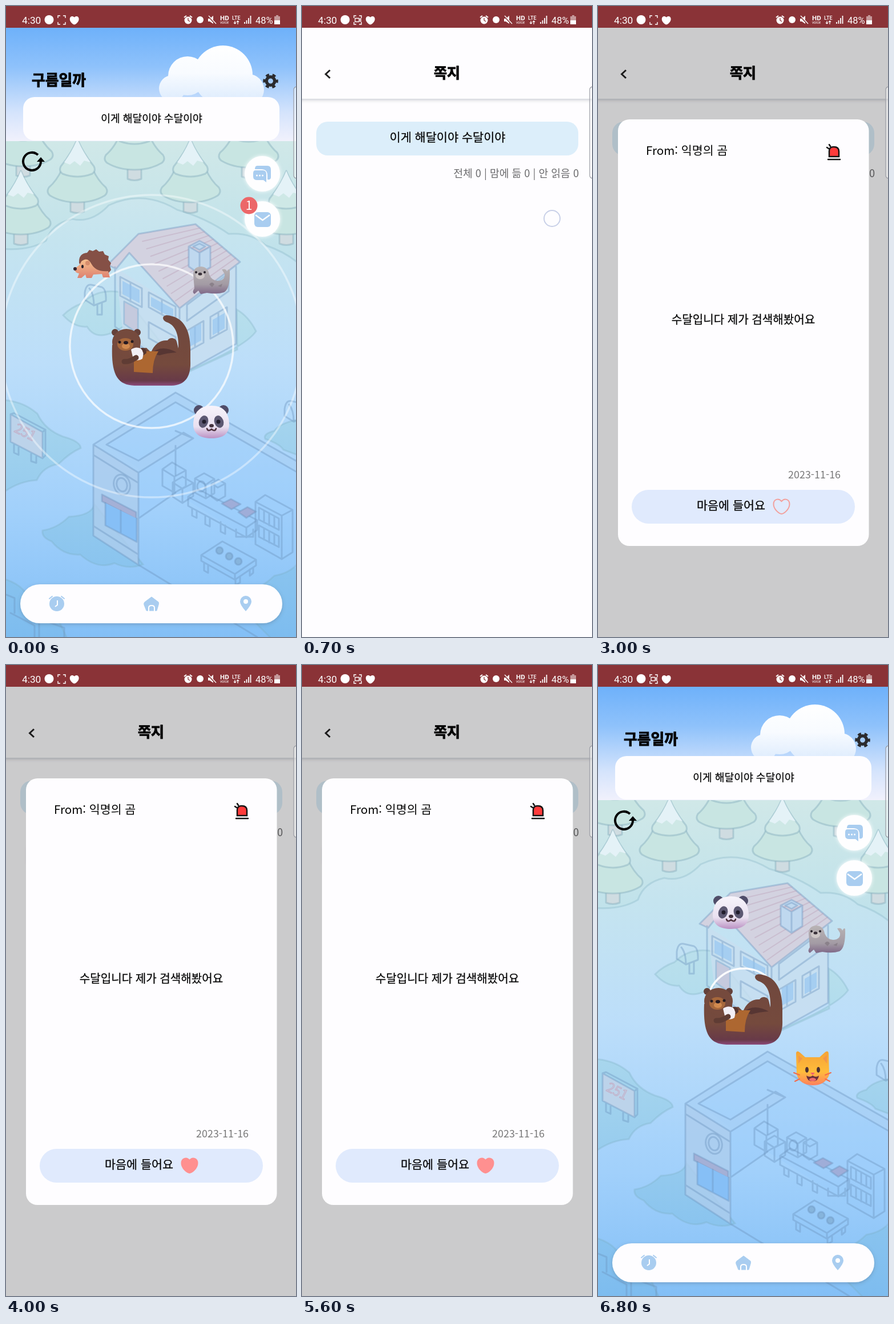
An HTML page for the animation above (6900 ms loop, 508 by 1102 pixels).

```html
<!DOCTYPE html>
<html lang="ko">
<head>
<meta charset="utf-8">
<style>
html, body { margin: 0; width: 100%; height: 100%; overflow: hidden; background: #fefdff; }
svg { display: block; width: 100%; height: 100%; }
text { font-family: "Noto Sans CJK KR", "Noto Sans CJK", "Noto Sans", sans-serif; fill: #050505; }
.heading { font-weight: 900; stroke: #050505; stroke-width: .9; }
.medium { font-weight: 500; stroke: #050505; stroke-width: .25; }
.line { fill: none; stroke: #6c94bd; stroke-width: 3; stroke-opacity: .4; stroke-linejoin: round; stroke-linecap: round; }
.status text { font-family: Roboto, sans-serif; fill: #fff; }
</style>
</head>
<body>
<svg viewBox="0 0 508 1102" preserveAspectRatio="none">
<defs>
  <linearGradient id="sky" x2="0" y2="1"><stop stop-color="#6eb1fa"/><stop offset=".35" stop-color="#8fc2fb"/><stop offset=".75" stop-color="#d5e4fc"/><stop offset="1" stop-color="#f1f1fc"/></linearGradient>
  <linearGradient id="ground" x2="0" y2="1"><stop stop-color="#d4e9eb"/><stop offset=".2" stop-color="#c5e4ef"/><stop offset=".45" stop-color="#bcdefa"/><stop offset=".75" stop-color="#a1d0fb"/><stop offset="1" stop-color="#83bff6"/></linearGradient>
  <linearGradient id="grass" gradientUnits="userSpaceOnUse" y1="236" x2="0" y2="1102"><stop stop-color="#d0e8e8"/><stop offset=".4" stop-color="#b3dded"/><stop offset="1" stop-color="#7dbcef"/></linearGradient>
  <linearGradient id="cloudFill" gradientUnits="userSpaceOnUse" y1="69" x2="0" y2="165"><stop stop-color="#fff"/><stop offset=".5" stop-color="#f8fbff"/><stop offset="1" stop-color="#deecfd"/></linearGradient>
  <linearGradient id="fur" x2="0" y2="1"><stop stop-color="#70483e"/><stop offset=".7" stop-color="#754a3d"/><stop offset=".93" stop-color="#683a48"/><stop offset="1" stop-color="#8c4b7c"/></linearGradient>
  <linearGradient id="sealFur" x2="0" y2="1"><stop stop-color="#b9b4b5"/><stop offset=".65" stop-color="#a39ba4"/><stop offset="1" stop-color="#7f6888"/></linearGradient>
  <linearGradient id="pandaFur" x2="0" y2="1"><stop stop-color="#f7f4fb"/><stop offset=".65" stop-color="#e9e0f0"/><stop offset="1" stop-color="#bb91c3"/></linearGradient>
  <linearGradient id="catFur" x2="0" y2="1"><stop stop-color="#f5a336"/><stop offset=".6" stop-color="#ffbc3b"/><stop offset="1" stop-color="#ff805e"/></linearGradient>
  <linearGradient id="skin" x2="0" y2="1"><stop stop-color="#f6c08e"/><stop offset="1" stop-color="#dd8170"/></linearGradient>
  <linearGradient id="badgeFill" x2="0" y2="1"><stop stop-color="#f8fcff"/><stop offset="1" stop-color="#d9e6f2"/></linearGradient>
  <filter id="shadow" x="-20%" y="-30%" width="140%" height="170%"><feDropShadow dx="0" dy="2" stdDeviation="3" flood-color="#456" flood-opacity=".3"/></filter>
  <filter id="glow" x="-30%" y="-30%" width="160%" height="160%"><feDropShadow dx="0" dy="0" stdDeviation="3" flood-color="#fff"/></filter>
  <clipPath id="groundClip"><path d="M0 236H508V1102H0Z"/></clipPath>
  <path id="heart" d="M0 13C-4 13-14 5-14-4C-14-13-5-15 0-9C5-15 14-13 14-4C14 5 4 13 0 13Z"/>
  <g id="tree" stroke="#86adbd" stroke-opacity=".45" stroke-width="3" stroke-linejoin="round">
    <path d="M-12 98H12V122Q0 127-12 122Z" fill="#cfdce1"/>
    <path d="M-27 48Q-36 68-50 80Q-55 88-48 94Q-28 106 0 106T48 94Q55 88 50 80Q36 68 27 48Z" fill="#c8e5e2"/>
    <path d="M0-5Q10 20 29 43Q33 51 26 56Q0 66-26 56Q-33 51-29 43Q-10 20 0-5Z" fill="#cee8e6"/>
    <path d="M0-5Q8 15 23 36L12 33L5 42L-5 34L-13 40L-23 36Q-8 15 0-5Z" fill="#e4f2f7" stroke="none"/>
  </g>
  <g id="mailbox" class="line"><path d="M-18-6Q-16-22-6-20L12-16Q20-12 19 8L-2 16L-18 6ZM-2 16Q-2-4-10-14M4 14V32H12V11"/></g>
</defs>

<g id="home">
  <path fill="url(#sky)" d="M0 38H508V236H0Z"/>
  <g fill="url(#cloudFill)"><circle cx="291" cy="144" r="23"/><circle cx="318" cy="122" r="34"/><circle cx="380" cy="121" r="52"/><circle cx="425" cy="146" r="27"/></g>
  <path fill="url(#ground)" d="M0 236H508V1102H0Z"/>
  <g clip-path="url(#groundClip)">
    <g fill="url(#grass)" stroke="#76a9ba" stroke-opacity=".28" stroke-width="3">
      <path d="M-5 230H513V450Q490 430 455 418Q430 395 390 398Q350 370 300 356Q240 320 180 348Q150 380 116 372Q80 380 70 410Q40 428-5 424Z"/>
      <path d="M100 540Q114 526 134 519Q160 492 203 500L312 640Q420 595 438 568Q425 542 404 530L405 600L300 648L205 560Q160 590 142 560Q120 562 100 540Z"/>
      <path d="M-5 688Q30 690 55 712Q68 740 100 752Q130 760 131 772Q112 780 92 800Q65 804 54 828Q22 830-5 850Z"/>
      <path d="M513 722Q480 728 470 742Q450 747 454 756Q480 765 486 775L513 785Z"/>
      <path d="M155 870Q150 890 110 892Q90 912 64 916Q62 928 80 935Q100 960 130 958Q160 985 190 973Q215 985 240 975Z"/>
      <path d="M-5 1000Q30 1010 40 1035Q85 1050 100 1090L110 1110H-5ZM513 970Q500 990 470 995Q440 1025 390 1030L470 1110H513Z"/>
    </g>
    <g id="trees"></g>

    <path d="M191 456L304 528L403 450V590L304 646L205 570Z" fill="#c8dff1" opacity=".8"/>
    <path d="M178 452L232 398L332 381L410 447L304 528L216 431L193 459Z" fill="#d3d2e0"/>
    <g class="line">
      <path d="M178 452L232 398L332 381L410 447L304 528L216 431L193 459ZM191 456V560L304 645L403 590V455M304 528V645M216 431L304 528"/>
      <path id="planks" stroke="#b99fb4" stroke-width="2"/>
      <path d="M200 473L238 493V526L200 506ZM218 483V516M250 500L297 525V552L250 526ZM273 513V539M207 516L231 529V572L207 555ZM250 552L297 578V606L250 580ZM317 567L346 550V588L317 604ZM331 559V596M358 543L387 526V565L358 581ZM372 535V573M317 522L390 467V498L317 550Z"/>
      <path d="M320 420L339 410L358 420V456L339 468L320 455ZM320 420L339 431L358 420M339 431V468M328 420L339 415L349 420L339 426Z" fill="#bfd8ef"/>
    </g>
    <path d="M322 565L342 554V584L322 595ZM362 548L383 536V563L362 575ZM204 480L234 496V519L204 503ZM254 508L293 529V546L254 524Z" fill="#8fc3f2" opacity=".6"/>
    <path d="M208 518L230 530V570L208 554Z" fill="#c7c2d8" opacity=".7"/>
    <use href="#mailbox" x="156" y="507"/>
    <use href="#mailbox" x="506" y="710"/>

    <path d="M8 713L64 744V790L8 761Z" fill="#bcd3ea"/>
    <path class="line" d="M8 713L64 744V790L8 761ZM14 765V780L22 784V770M44 782V795L53 798V786M8 713L14 711L69 740L64 744M69 740V785L64 790"/>
    <text x="13" y="743" font-size="23" transform="rotate(27 13 743)" style="fill:none;stroke:#c6a5bd;stroke-width:1.1" opacity=".8">251</text>

    <path d="M153 766L232 815V976L153 925Z" fill="#adcdee" opacity=".8"/>
    <path d="M176 766L297 692L520 820V990L297 850L232 895V808Z" fill="#95c8f8" opacity=".35"/>
    <path d="M153 766L297 675L520 801V820L297 692L176 766L232 794L311 745L328 755L232 815Z" fill="#a9d1f6" opacity=".7"/>
    <g class="line">
      <path d="M153 766L297 675L520 801M176 766L297 692L520 820M153 766L232 815L328 755L311 745L232 794L176 766M153 766V925L232 976V815M232 976L440 1102M153 784L232 833M297 768V819M232 895L297 850M153 908L232 958M328 755L297 742"/>
      <path d="M168 853L228 884V896L168 865Z" fill="#a4b0d6"/>
      <path d="M174 868V907L229 936V895M201 881V921" fill="#86bff6"/>
      <ellipse cx="203" cy="836" rx="14" ry="18" transform="rotate(-16 203 836)"/>
      <ellipse cx="203" cy="836" rx="9" ry="12" transform="rotate(-16 203 836)"/>
      <path d="M274 809L291 797L315 811V839L295 850L274 838ZM274 809L295 822L315 811M295 822V850M292 832L309 822L328 833V856L309 868L292 857ZM292 832L309 843L328 833M309 843V868"/>
      <path d="M319 857L337 844L440 898V915L421 928L319 873ZM319 857L421 911L440 898M421 911V928M326 877V890L334 894V882M349 889V905L357 909V894M376 901V918L384 922V907M403 914V927H433V914"/>
      <path d="M331 825L347 816L365 826V851L350 860L331 850ZM331 825L350 836L365 826M350 836V860M360 834L372 827L384 834V856L370 864L360 857ZM360 834L371 841L384 834"/>
      <ellipse cx="342" cy="839" rx="7" ry="9"/>
      <path d="M378 869L394 861L411 870L395 879ZM407 884L423 875L438 883L421 894Z" fill="#9fadd8"/>
      <path d="M437 866L454 854L502 880V954L483 966L437 940ZM437 866L483 890L502 880M483 890V966M443 876L478 895V915L443 897ZM443 907L478 926V945L443 927ZM452 881V902M461 886V907M470 891V911M452 912V932M461 917V937M470 922V941"/>
      <path d="M342 959L379 935L438 967L401 992ZM342 959V969L401 1002L438 977V967M401 992V1002M347 973V986L354 990V977M402 1001V1011L410 1007V996M427 984V995L433 990V981"/>
      <g fill="#86b4dc"><circle cx="374" cy="951" r="6"/><circle cx="391" cy="961" r="6"/><circle cx="407" cy="970" r="6"/></g>
      <path d="M0 1028L15 1034V1060M58 1070L102 1086V1102M58 1070V1102M8 1060L50 1082V1102"/>
    </g>
  </g>

  <g id="ripples" fill="none" stroke="#fff" stroke-width="3.5"></g>

  <g id="otter">
    <path fill="url(#fur)" d="M186 592C184 642 194 662 225 663H290C316 662 324 645 323 620V600C323 563 309 542 281 540C273 541 273 548 281 552C297 557 303 574 302 598L299 586A9 9 0 0 0 283 584Q263 583 254 605L246 597L235 598V587Z"/>
    <path d="M254 607Q272 590 299 605Q282 606 269 610Z" fill="#573633"/>
    <path d="M224 603H267Q257 617 257 641L224 639Z" fill="#ad6731"/>
    <circle cx="191" cy="570" r="6" fill="#64413a"/><circle cx="230" cy="570" r="6" fill="#64413a"/>
    <ellipse cx="211" cy="587" rx="25" ry="23" fill="#754a3d"/>
    <ellipse cx="209" cy="591" rx="14" ry="11" fill="#a7683c"/>
    <ellipse cx="210" cy="594" rx="7" ry="5" fill="#d18a4f"/>
    <ellipse cx="210" cy="588" rx="4" ry="3" fill="#261a22"/>
    <circle cx="199" cy="587" r="2.5" fill="#251b20"/><circle cx="221" cy="586" r="2.5" fill="#251b20"/>
    <path d="M233 598Q246 594 246 606L236 614Z" fill="#57362f"/>
    <path d="M219 600Q227 594 236 598Q243 604 239 616Q232 621 223 617Z" fill="#f3eff5"/>
    <path d="M207 621Q216 622 228 614" fill="none" stroke="#5f3c34" stroke-width="9" stroke-linecap="round"/>
  </g>

  <g id="hedgehog">
    <path d="M128 449Q127 432 142 431L146 426L152 428L158 425L163 429L170 428L173 434L180 437L179 443L184 449L182 454L184 461L179 467H142Z" fill="#855046"/>
    <path d="M119 459Q130 453 132 446Q143 437 150 451Q158 465 179 463L182 474H170L168 468L153 469L150 475H141L139 469L132 475H125L128 467Q121 466 119 459Z" fill="url(#skin)"/>
    <circle cx="143" cy="449" r="4" fill="#d78d6c"/><circle cx="121" cy="459" r="3" fill="#34242e"/><ellipse cx="134" cy="455" rx="2" ry="3" fill="#27212b"/>
  </g>

  <g id="seal">
    <path d="M328 469Q328 455 342 455Q354 456 356 469Q362 483 377 479Q384 476 383 468L378 460Q386 458 387 464Q390 458 392 461Q393 494 382 500Q370 504 352 501L341 503L337 497L330 503Q325 500 330 493Z" fill="url(#sealFur)"/>
    <path d="M356 486Q361 480 365 486L361 491ZM371 489L379 485L377 491Z" fill="#8a818a"/>
    <ellipse cx="340" cy="471" rx="8" ry="6" fill="#cdc6c6"/><ellipse cx="340" cy="468" rx="3.5" ry="2.5" fill="#39313a"/>
    <circle cx="333" cy="465" r="2" fill="#29242c"/><circle cx="348" cy="465" r="2" fill="#29242c"/>
  </g>

  <g id="panda">
    <circle cx="338" cy="706" r="9" fill="#504d69"/><circle cx="381" cy="706" r="9" fill="#504d69"/>
    <path d="M328 732C328 709 340 698 360 698S391 709 391 732C390 749 378 755 360 755S329 749 328 732Z" fill="url(#pandaFur)"/>
    <ellipse cx="346" cy="726" rx="8" ry="11" transform="rotate(20 346 726)" fill="#5c5872"/><ellipse cx="373" cy="726" rx="8" ry="11" transform="rotate(-20 373 726)" fill="#5c5872"/>
    <circle cx="347" cy="726" r="3.5" fill="#211d2c"/><circle cx="372" cy="726" r="3.5" fill="#211d2c"/>
    <ellipse cx="360" cy="733" rx="4" ry="3" fill="#44333f"/>
    <path d="M352 738Q354 744 360 739Q366 744 368 738" fill="none" stroke="#513541" stroke-width="2.5" stroke-linecap="round"/>
  </g>

  <g id="cat">
    <path d="M348 715L347 678Q348 672 354 677L363 685H388L398 676Q404 672 404 680L405 716Q398 734 376 734Q353 733 348 715Z" fill="url(#catFur)"/>
    <path d="M351 682L358 687L351 696ZM401 681L394 687L401 696Z" fill="#f2964a"/>
    <ellipse cx="366" cy="707" rx="3" ry="5" fill="#4b3033"/><ellipse cx="386" cy="707" rx="3" ry="5" fill="#4b3033"/>
    <path d="M372 712H380L376 716Z" fill="#f05d70"/>
    <path d="M365 717Q371 721 376 717Q382 721 387 717Q386 727 376 727Q366 727 365 717Z" fill="#6a313b"/><ellipse cx="376" cy="724" rx="6" ry="3" fill="#ef6b6d"/>
    <path d="M343 712L353 716M345 727L353 723M408 712L398 716M406 727L398 723" stroke="#f46b4b" stroke-width="2" stroke-linecap="round"/>
  </g>

  <rect x="30" y="159" width="449" height="76" rx="20" fill="#fefdff"/>
  <text class="heading" x="45" y="139" font-size="25.8">구름일까</text>
  <text class="medium" x="255" y="203" font-size="18.2" text-anchor="middle">이게 해달이야 수달이야</text>
  <g transform="translate(463.5 131)" fill="none" stroke="#2b2b2e"><circle r="7.2" stroke-width="5.5"/><circle r="11" stroke-width="4.5" stroke-dasharray="5.76" stroke-dashoffset="2.88"/></g>
  <path d="M56 260A15.500 15.500 0 1 0 61 271" fill="none" stroke="#000" stroke-width="4"/><path d="M54 272L61 264L68 272Z"/>

  <g fill="#fefeff" filter="url(#glow)"><circle cx="449" cy="293" r="31"/><circle cx="449" cy="372" r="31"/></g>
  <g fill="#a9cdf0">
    <path d="M440 279H458Q464 279 464 286V299Q464 304 458 303V296Q458 285 447 285H436Q436 279 440 279Z"/>
    <path d="M437 287H450Q456 287 456 294V308L451 304H440Q433 304 433 298V292Q433 287 437 287Z"/>
    <rect x="435" y="360" width="29" height="26" rx="6"/>
  </g>
  <path d="M437 365L449.5 374L462 365" fill="none" stroke="#fff" stroke-width="2.5"/>
  <g fill="#fff"><circle cx="439.5" cy="296" r="1.5"/><circle cx="444.5" cy="296" r="1.5"/><circle cx="449.5" cy="296" r="1.5"/></g>
  <g id="badge"><circle cx="425.5" cy="348.5" r="15" fill="#ec6769"/><text x="425.5" y="356" font-size="21" text-anchor="middle" style="fill:#fff">1</text></g>

  <rect x="25" y="1010" width="459" height="68" rx="34" fill="#fefdff" filter="url(#shadow)"/>
  <g fill="#a9cdf0">
    <circle cx="89" cy="1044" r="13"/><path d="M76 1035L81 1031M102 1035L97 1031" stroke="#a9cdf0" stroke-width="2" stroke-linecap="round"/>
    <path d="M255 1032L267 1041Q268 1043 267 1046L264 1056H246L242 1046Q241 1043 243 1041Z" stroke="#a9cdf0" stroke-linejoin="round"/>
    <path d="M420 1057Q410 1046 410 1040A10 10 0 0 1 430 1040Q430 1046 420 1057Z"/>
  </g>
  <path d="M90 1038V1046L86 1049M250 1057V1051Q250 1047 255 1047T260 1051V1057" fill="none" stroke="#fff" stroke-width="2"/><circle cx="420" cy="1040" r="4" fill="#fff"/>
</g>

<g id="notes">
  <path d="M0 38H508V1102H0Z" fill="#fefdff"/>
  <path d="M-9 30H517V162H-9Z" fill="#fefdff" filter="url(#shadow)"/>
  <path d="M49 112L41.5 119L49 126" fill="none" stroke="#222" stroke-width="3"/>
  <text class="heading" x="254" y="126" font-size="25" text-anchor="middle">쪽지</text>
  <rect x="25" y="202" width="459" height="59" rx="20" fill="#dceefa"/>
  <text class="medium" x="255" y="237" font-size="20.8" text-anchor="middle">이게 해달이야 수달이야</text>
  <text id="counts" x="485" y="299" font-size="18.2" font-weight="300" text-anchor="end" style="fill:#6a6a6c"></text>
  <g id="unread"></g>
  <g id="read"></g>
  <g id="liked"><rect x="39" y="315" width="34" height="31" rx="4" fill="url(#badgeFill)" filter="url(#shadow)"/><use href="#heart" transform="translate(56 330) scale(.62)" fill="#ff8d90"/></g>
  <g id="popup">
    <path d="M0 38H508V1102H0Z" fill-opacity=".2"/>
    <rect x="35" y="198" width="439.5" height="745" rx="20" fill="#fefdff"/>
    <text x="84" y="260" font-size="20.6">From: 익명의 곰</text>
    <g stroke="#151515" stroke-width="2.5" stroke-linecap="round"><path d="M405 263V253Q405 246 413 246Q422 246 422 254V263Z" fill="#ff3b3b"/><path d="M403 268H424M404 249L401 247M407 245L405 242"/></g>
    <text class="medium" x="254.5" y="555" font-size="20.1" text-anchor="middle">수달입니다 제가 검색해봤어요</text>
    <text x="425" y="825" font-size="17.9" text-anchor="end" style="fill:#777">2023-11-16</text>
    <rect x="59" y="845" width="391" height="59" rx="29.5" fill="#e0eafd"/>
    <text class="medium" x="173" y="880" font-size="20.7">마음에 들어요</text>
    <use id="like" href="#heart" x="321.5" y="874" stroke-width="2"/>
  </g>
</g>

<rect x="504" y="141" width="12" height="160" rx="5" fill="#fff" fill-opacity=".45" stroke="#999ba3" stroke-width="1.2"/>
<circle id="touch" r="14" fill="#fff" fill-opacity=".35" stroke="#c9d0e8" stroke-width="2"/>

<g class="status" fill="#fff" stroke="none">
  <path d="M0 0H508V38H0Z" fill="#8a3337"/>
  <text x="28" y="31" font-size="17.3">4:30</text>
  <circle cx="75.5" cy="24" r="8"/>
  <path d="M91 21V17H95M100 17H104V21M104 28V32H100M95 32H91V28" fill="none" stroke="#fff" stroke-width="1.4"/>
  <path id="camera" d="M93 21.5H100V27.5H93ZM100 24L103 22V27L100 25" fill="none" stroke="#fff" stroke-width="1.3"/>
  <use href="#heart" transform="translate(119.7 25) scale(.57)"/>
  <circle cx="319" cy="25" r="6.5"/><path d="M312 20L316 17M326 20L322 17" stroke="#fff" stroke-width="2"/><path d="M319 21V25L322 27" fill="none" stroke="#8a3337" stroke-width="1.3"/>
  <circle cx="340" cy="24" r="6"/>
  <path d="M354 22H357L363 17V31L357 27H354Z"/><path d="M354 17L367 31" stroke="#8a3337" stroke-width="3"/><path d="M355 17L368 31" stroke="#fff" stroke-width="1.3"/>
  <text x="375" y="25" font-size="11.5" font-weight="700">HD</text><text x="375" y="31" font-size="6.5">voice</text>
  <text x="396" y="24" font-size="9" font-weight="500">LTE</text>
  <path id="traffic" d="M401 26V31M399 29L401 31L403 29M406 32V26M404 28L406 26L408 28" fill="none" stroke="#fff" stroke-width="1.2"/>
  <path d="M418 28V31M421.5 25V31M425 21V31M428.5 17V31" stroke="#fff" stroke-width="1.8"/>
  <text x="437" y="31" font-size="16.5">48%</text>
  <path d="M473 16H477V18H480V32H470V18H473Z" fill-opacity=".5"/><path d="M470 25H480V32H470Z"/>
</g>
</svg>
<script>
const LOOP = 6900;
const MAIL_OPEN = 600, NOTE_ARRIVES = 900, POPUP_OPEN = 2400, LIKED = 3500, POPUP_CLOSE = 5700, BACK_HOME = 6700;
const taps = [
  { x: 438, y: 371, from: 300, to: 800 },
  { x: 94, y: 381, from: 1950, to: 2350, alpha: .3 },
  { x: 321, y: 873, from: 3150, to: 3650 },
  { x: 42, y: 137, from: 6350, to: 6700 },
];
const $ = id => document.getElementById(id);
const show = (id, on) => $(id).style.display = on ? '' : 'none';
const mix = (a, b, k) => a + (b - a) * k;

// Trees by tip position
$('trees').innerHTML = [[225, 180], [30, 174], [425, 176], [125, 237], [323, 237], [26, 293], [491, 293]]
  .map(([x, y]) => `<use href="#tree" x="${x}" y="${y}"/>`).join('');

// Roof boards run along the ridge
$('planks').setAttribute('d', Array.from({ length: 9 }, (_, i) => {
  const k = (i + 1) / 10;
  return `M${mix(232, 304, k)} ${mix(398, 528, k)}L${mix(332, 410, k)} ${mix(381, 447, k)}`;
}).join(''));

function drawNote(id, light, mid, dark) {
  const fade = (name, a, b) => `<linearGradient id="${id}${name}" x2="1" y2="1"><stop stop-color="${a}"/><stop offset="1" stop-color="${b}"/></linearGradient>`;
  const part = (points, name) => `<polygon points="${points}" fill="url(#${id}${name})"/>`;
  $(id).innerHTML = fade('Band', light, mid) + fade('Fold', light, mid) + fade('Flap', mid, light) +
    part('58,380 131,380 131,445 58,445', 'Fold') +
    part('94,412 131,445 58,445', 'Flap') +
    part('118,327 154,359 131,380 96,347', 'Fold') +
    part('73,327 131,379 94,412 36,359', 'Band') +
    `<path d="M96 347L131 379L94 412L58 445M94 412L131 445" fill="none" stroke="${dark}" stroke-width="1.5"/>`;
}
drawNote('unread', '#c9c9c9', '#a6a6a6', '#858585');
drawNote('read', '#ffd0ae', '#fab08c', '#cf7f62');
$('read').setAttribute('transform', 'rotate(180 94.5 386)');

function drawRipples(t) {
  const newest = t < MAIL_OPEN ? 22 + .121 * t : 64 + .121 * (t - 6800);
  const count = t < MAIL_OPEN ? 3 : 1;
  $('ripples').innerHTML = Array.from({ length: count }, (_, i) => newest + 121 * i)
    .filter(r => r >= 55)
    .map(r => `<circle cx="255" cy="594" r="${r}" opacity="${Math.max(0, .95 - (r - 60) / 370)}"/>`).join('');
}

function drawTouch(t) {
  const tap = taps.find(p => t >= p.from && t < p.to);
  show('touch', tap);
  if (!tap) return;
  $('touch').setAttribute('transform', `translate(${tap.x} ${tap.y})`);
  $('touch').setAttribute('opacity', (tap.alpha || 1) * Math.min(1, (t - tap.from) / 100, (tap.to - t) / 100));
}

function draw(t) {
  const returned = t >= BACK_HOME, atHome = t < MAIL_OPEN || returned;
  const arrived = t >= NOTE_ARRIVES, opened = t >= POPUP_OPEN, liked = t >= LIKED;
  show('home', atHome);
  show('notes', !atHome);
  show('hedgehog', !returned);
  show('badge', !returned);
  show('cat', returned);
  $('seal').setAttribute('transform', returned ? 'translate(41 0)' : '');
  $('panda').setAttribute('transform', returned ? 'translate(-127 -294)' : '');
  if (atHome) drawRipples(t);

  $('counts').textContent = `전체 ${+arrived} | 맘에 듦 ${+liked} | 안 읽음 ${+(arrived && !opened)}`;
  show('unread', arrived && !opened);
  show('read', opened);
  show('liked', liked);
  show('popup', opened && t < POPUP_CLOSE);
  $('like').setAttribute('fill', liked ? '#ff9090' : 'none');
  $('like').setAttribute('stroke', liked ? '#ff9090' : '#f2a09d');

  const blink = t % 1000;
  show('camera', blink >= 500 && blink < 900);
  $('traffic').setAttribute('opacity', t >= 4800 && t < 5100 ? .4 : 1);
  drawTouch(t);
}

function tick() {
  draw(performance.now() % LOOP);
  requestAnimationFrame(tick);
}
tick();
</script>
</body>
</html>
```
